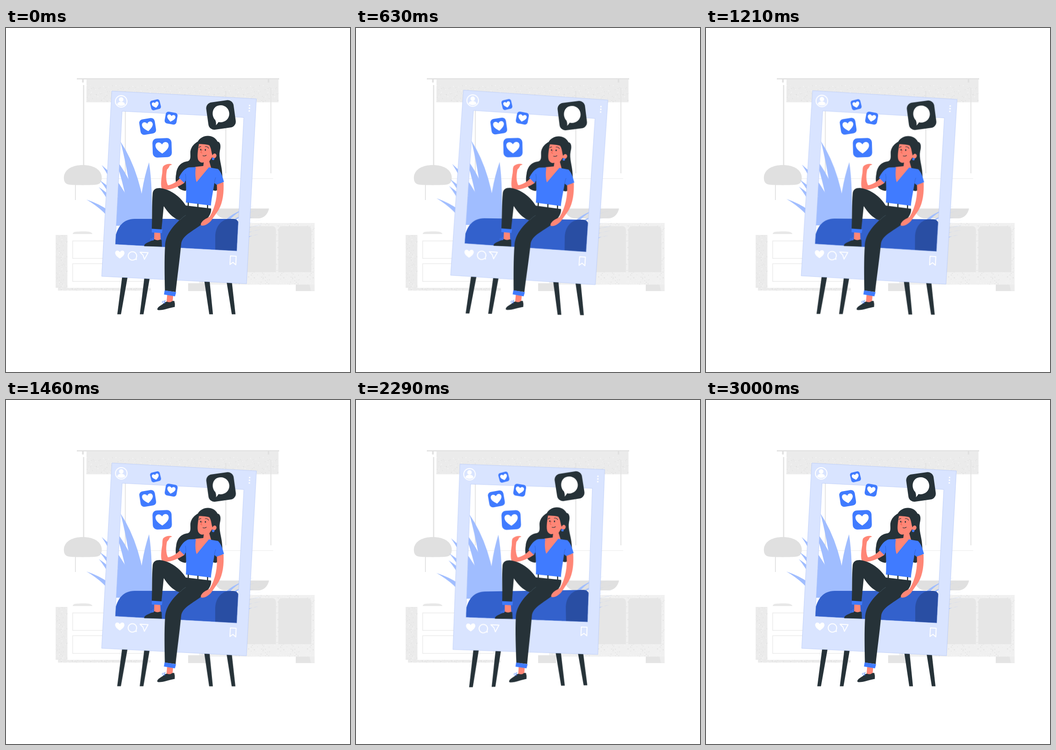
An HTML page for the animation above (3.04 s loop, 748 by 748 pixels).

```html
<!DOCTYPE html>
<html lang="en">
<head>
<meta charset="utf-8">
<title>Post frame</title>
<style>
  html, body { margin: 0; width: 100%; height: 100%; overflow: hidden; background: #fff; }
  svg { display: block; width: 100vw; height: 100vh; }
  #scene { transform-origin: 367px 380px; }
  .dark { fill: #263238; }
  .blue { fill: #407bff; }
  .skin { fill: #ff8676; }
  .leaf { fill: #a0bdff; }
  .white { fill: #fff; }
  .line { fill: none; stroke: #fff; stroke-width: 2; stroke-linejoin: round; stroke-linecap: round; }
  .ink { fill: none; stroke: #263238; stroke-width: 1.1; stroke-linecap: round; }
</style>
</head>
<body>
<svg viewBox="0 0 748 748">
  <defs>
    <pattern id="grain" width="64" height="64" patternUnits="userSpaceOnUse"></pattern>
    <clipPath id="window"><path d="M252.5 181 517 194.5 502 485 237.5 470.5Z"/></clipPath>
    <path id="heart" d="M0 .42C-.2 .28-.48 .08-.48-.16C-.48-.44-.14-.5 0-.24C.14-.5 .48-.44 .48-.16C.48 .08 .2 .28 0 .42Z"/>
  </defs>

  <g id="room">
    <path fill="#ebebeb" d="M175 112H592.500V161.500H175Z"/>
    <path fill="url(#grain)" d="M175 124H592.500V161.500H175Z"/>
    <path fill="#e0e0e0" d="M154 109.300H594V111.800H154ZM165.500 111H169V118.500H165.500ZM569 111H572.500V118.500H569Z"/>
    <g fill="none" stroke="#e4e4e4" stroke-width="2">
      <path d="M168.800 124V299" stroke-width="2.800"/>
      <path d="M151 340V374M259.500 137V316M478 137V316M576 130V316"/>
      <path d="M208 327.500H581" stroke="#ebebeb" stroke-width="1"/>
    </g>
    <path fill="#e0e0e0" d="M126 322C129 306 146 298 167 298C188 298 205 306 208 322C209 333 206 339 197 340.500C188 342 146 342 137 340.500C128 339 125 333 126 322Z"/>

    <path fill="#ebebeb" d="M108 450H133.500V565H315V571H113V565H108Z"/>
    <path fill="url(#grain)" d="M108 450H133.500V565H315V571H113V565H108Z"/>
    <path fill="#e8e8e8" d="M145 448C146 442 153 443 160 442.500C174 442 186 442 188 448Z"/>
    <path fill="#fff" stroke="#ebebeb" stroke-width="1.500" d="M145 463H300V501H145ZM145 512.500H300V551H145Z"/>

    <path fill="#e0e0e0" d="M453 392.500H572C569 406 560 414 548 414H477C465 414 456 406 453 392.500Z"/>
    <path fill="#f0f0f0" d="M420 424H671V558H420Z"/>
    <path fill="url(#grain)" d="M420 424H671V558H420Z"/>
    <path fill="#e6e6e6" d="M505 431H580Q587 432 587 440V531H505ZM592 439Q593 431 601 431H656Q664 432 664 440V531H592Z"/>
    <path fill="#e4e4e4" d="M396 555H435V572H396ZM630 558H671V572H630Z"/>
    <path fill="#ededed" d="M630 558H660L663 571.500H671V558Z"/>
  </g>

  <g id="scene">
    <g id="stool" class="dark"></g>
    <g id="plants" class="leaf"></g>

    <g clip-path="url(#window)">
      <path fill="#3361cc" d="M236 500V466C239 434 254 415 280 415H490L508 500Z"/>
      <path fill="#294ea3" d="M455 500V452C456 429 470 415 488 415H494C502 415 506 420 506 428L504 500Z"/>
    </g>

    <path fill="#d9e4ff" stroke="#a9bff5" stroke-width=".6" fill-rule="evenodd" d="M230 137 544.500 154 523 556 208 540ZM252.500 181 237.500 470.500 502 485 517 194.500Z"/>

    <g id="icons">
      <circle class="line" cx="250.500" cy="159.500" r="12.600"/>
      <circle class="white" cx="250.500" cy="155.500" r="4.900"/>
      <path class="white" d="M241.500 166C243 161.500 247 160.500 250.500 160.500C254 160.500 258 162 259 166.500C255 170.500 245 170.500 241.500 166Z"/>
      <path class="line" d="M529.600 168.500V168.600M529.300 174.300V174.400M529 180.200V180.300" style="stroke-width:3.400"/>
      <path class="line" d="M281 502.500A9.200 9.200 0 1 1 283 500L283.500 503.500Z"/>
      <path class="line" d="M291.500 487.500 309 488.500 301 503 298 494Z"/>
      <path class="line" d="M488 495.500 500.500 496.200 499.700 515 493.500 509.500 487 514.300Z"/>
    </g>
    <g id="likes"></g>

    <rect class="dark" x="-30" y="-30" width="60" height="60" rx="13" transform="translate(467.500 189) rotate(-8)"/>
    <path class="white" d="M455 200C445 190 448 168 467 168C477 168 485.500 176 485.500 186.500C485.500 197 477 205 466 205L462 204.500Q460 208 456.500 211.500Q457.500 206 455 200Z"/>

    <g id="woman">
      <path class="dark" d="M417 247C426 231 451 230 460 247C467 248 467.500 258 465 267C462 282 469 298 470 315C472 336 469 352 455 354L397 340L391 354C373 353 366 338 370 317C372 298 384 291 394 290C404 288 400 276 401 268C403 257 410 251 417 247Z"/>
      <path class="skin" d="M379 326C371 335 361 341 352 342C347 331 348 318 350 308C353 305 355 302 356 299L361 297C357 294.500 348 295 342 300.500C339 305 341 311 339 320C337 333 336 346 340 350.500C351 355 375 346 389 336Z"/>

      <path class="skin" d="M420 250C417 266 415 280 418 287C421 292 426 294 430 292L429 300L411 302L411 338L436 330L446 304L442 290L448 281C453 287 459 280 457.500 276C456 272 451 272 449 275L449 250Z"/>
      <path class="dark" d="M417 252C420 240 441 238 450 248L462 271C456 271 451 272 449 277C446 270 447 262 442 255C434 252 425 253 417 252Z"/>
      <circle class="blue" cx="450.500" cy="284.500" r="2.700"/>
      <ellipse class="dark" cx="423.500" cy="264.500" rx="1.200" ry="1.900"/>
      <ellipse class="dark" cx="433.500" cy="265" rx="1.300" ry="2"/>
      <path class="ink" d="M419.500 260Q421 257.500 424 258M433 258Q438 257 440.500 261.500M428 277.500Q432 279.500 435.500 276.500"/>
      <path d="M427 264 423.500 270.500Q424.500 272 426.500 271.500" fill="none" stroke="#e8503f" stroke-width="1"/>

      <path class="blue" d="M398 303 413 302.500C411 314 411.500 326 414.500 335L441 303L461 306.500C468 313 471 324 474 334.500L458 341L453 337C451 353 447 369 445.500 387L391 382C392 367 392 350 391 331L387.500 337L376 325.500C381 315 388 305 398 303Z"/>
      <path d="M391 331Q391.500 323 390 317M453 337Q454 330 456 325" fill="none" stroke="#315fc6" stroke-width=".8"/>
      <path class="white" d="M391 379.500 445.500 386V393.500L391 387.500Z"/>
      <path class="dark" d="M391 386 446 392.500C448 408 430 425 414 435C396 447 383 455 381 469C377 510 372 545 369 574L345.500 571C345 540 344 503 346 472C347 450 363 431 377 418C360 412 351 399 343 387.500L338 439L317 437C318 412 317 382 319 359C320 351 326 348 334 348C358 350 380 368 391 386Z"/>
      <path class="dark" d="M395 379.500H397.500V390H395ZM416 382H418.500V393H416ZM437 385H439.500V396H437Z"/>
      <path d="M366 412Q374 419 379 417Q384 411 391 407" fill="none" stroke="#455a64" stroke-width=".8"/>
      <path class="skin" d="M458.500 340.500 473 335C474 357 472 379 462 396L446 419C440 426 431 431 425 429.500C421 427 427 418 436 414L443 410C456 388 460 364 458.500 340.500Z"/>

      <path class="skin" d="M322.500 444H335.500L336.500 464H322Z"/>
      <path class="blue" d="M317 436.500 340 438 339 446 317 444.500Z"/>
      <path class="dark" d="M300.500 474.500C300 468 311 466 317 462L323 459.500Q329 463 335.500 460L338.500 461 339 475.500Z"/>
      <path class="skin" d="M350.500 580 363.500 582 362 598 349 597Z"/>
      <path class="blue" d="M345 570.500 370 574.500 367.500 583.500 343.500 579.500Z"/>
      <path class="dark" d="M329 611C330 605 341 602 346 596L350 595Q357 598 362 593.500L366 593.500Q368 600 367 606.500C357 608 342 614 332 613.500Q329 613.500 329 611Z"/>
      <path d="M346 598C338 600 339 592 343 594.500Q346 597 346 598Q343 591 347 592.500M321 461C313 464 312 458 316 458.500Q320 460 321 461Q317 455 321 456" fill="none" stroke="#407bff" stroke-width="1"/>
    </g>
  </g>
</svg>

<script>
const NS = 'http://www.w3.org/2000/svg';
const $ = id => document.getElementById(id);

function add(parent, tag, attrs) {
  const el = document.createElementNS(NS, tag);
  for (const k in attrs) el.setAttribute(k, attrs[k]);
  return parent.appendChild(el);
}

// speckled furniture texture
let seed = 7;
const rand = () => (seed = seed * 16807 % 2147483647) / 2147483647;
for (let i = 0; i < 190; i++) {
  add($('grain'), 'circle', {
    cx: rand() * 64, cy: rand() * 64, r: 0.4 + rand() * 0.8,
    fill: i % 2 ? '#f4f4f4' : '#e1e1e1'
  });
}

// tapered stool legs from behind the frame to the floor
for (const [top, foot] of [[259, 246], [307.5, 295], [435.5, 446], [483.5, 495]]) {
  add($('stool'), 'path', { d: `M${top - 6} 538H${top + 6}L${foot + 4} 622.5H${foot - 4}Z` });
}

// a blade rises steeply from its base and bends over towards its tip
function leaf(x, y, baseX, baseY, w) {
  const cx = x + (baseX - x) * 0.75, cy = y + (baseY - y) * 0.4, h = w / 2;
  add($('plants'), 'path', {
    d: `M${x} ${y}Q${cx - h} ${cy + h / 3} ${baseX - h} ${baseY}H${baseX + h}Q${cx + h} ${cy - h / 3} ${x} ${y}Z`
  });
}
const tips = [[311, 292], [249, 247], [237, 284], [208, 298], [204, 331], [202, 346], [175, 373]];
tips.forEach(([x, y], i) => leaf(x, y, 303 - i * 10, 430, 28 - i * 2));
for (let i = 0; i < 7; i++) {
  leaf(548 + 12 * Math.sin(i / 2), 383 + i * 11, 480 + i * 7, 420 + i * 6, 9);
}

function heart(parent, size, x = 0, y = 0) {
  add(parent, 'use', { href: '#heart', class: 'white', transform: `translate(${x} ${y}) scale(${size})` });
}

// x, y, size, tilt
const likes = [[325, 167, 21.5, -14], [359, 196, 26, 10], [308, 214, 34, -9], [339.5, 260.5, 41.5, -2]];
for (const [x, y, s, tilt] of likes) {
  const g = add($('likes'), 'g', { transform: `translate(${x} ${y}) rotate(${tilt})` });
  add(g, 'rect', { class: 'blue', x: -s / 2, y: -s / 2, width: s, height: s, rx: s * 0.23 });
  heart(g, s * 0.72);
}
heart($('icons'), 21, 247.5, 492.5);

// gentle sway: time in ms, angle in degrees
const LOOP = 3040;
const sway = [[0, 0], [750, 1], [2250, -1], [3000, 0], [LOOP, 0]];
$('scene').animate(
  sway.map(([t, deg]) => ({ offset: t / LOOP, transform: `rotate(${deg}deg)` })),
  { duration: LOOP, iterations: Infinity, easing: 'linear' }
);
</script>
</body>
</html>
```
